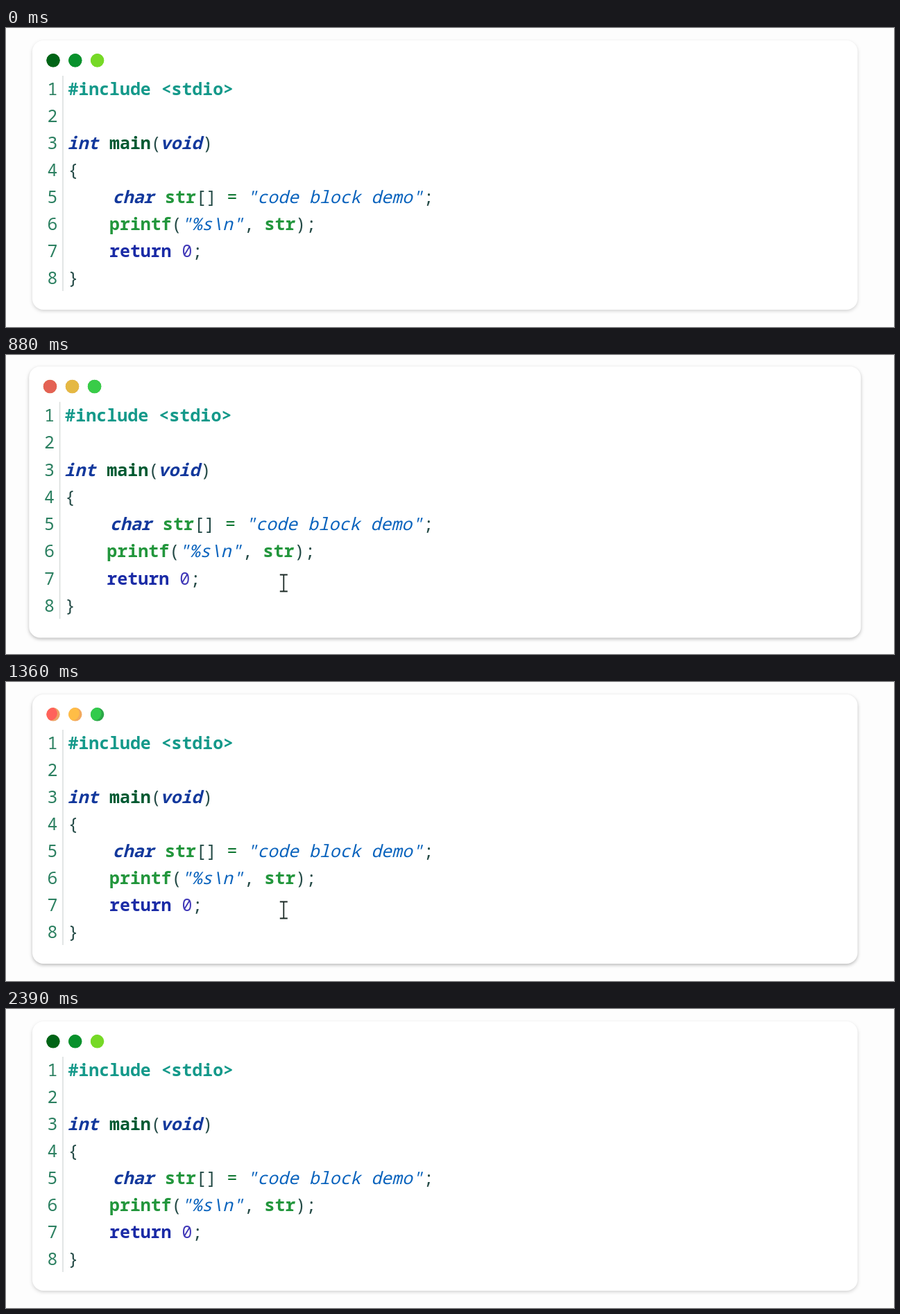
Animation, 1280 px wide and 432 px high, one loop 3140 ms. Source, as an HTML page:

```html
<!DOCTYPE html>
<html lang="en">
<head>
<meta charset="utf-8">
<title>Code block</title>
<style>
html, body { margin: 0; width: 100%; height: 100%; overflow: hidden; background: #fdfdfd; }
svg { display: block; }
text { font: 24.85px "Noto Sans Mono", "DejaVu Sans Mono", monospace; white-space: pre; }
.num { fill: #2c8061; }
.pre { fill: #14998a; font-weight: bold; }
.type { fill: #12389c; font-weight: bold; font-style: italic; }
.main { fill: #005a32; font-weight: bold; }
.id { fill: #22963c; font-weight: bold; }
.str { fill: #0a63bd; font-style: italic; }
.key { fill: #1a2ba6; font-weight: bold; }
.zero { fill: #4038b8; }
.op { fill: #117733; }
.p { fill: #254b47; }
</style>
</head>
<body>
<svg width="1280" height="432" viewBox="0 0 1280 432">
  <clipPath id="dotClip"></clipPath>
  <g id="card">
    <rect id="panel" x="38" y="18" width="1189.5" height="389" rx="16" fill="#fff"/>
    <g id="rims"></g>
    <g clip-path="url(#dotClip)"><g id="faces"></g></g>
    <path d="M82 69V380" stroke="#d9dddc" stroke-width="1.5"/>
    <g id="code"></g>
  </g>
  <path id="cursor" d="M-5.5 -12H5.5M-5.5 12H5.5M0 -12V12" fill="none" stroke="#1c2a26" stroke-width="1.8"/>
</svg>
<script>
const LOOP = 3140, CHAR = 14.9;
const $ = id => document.getElementById(id);

function add(parent, name, attrs, content = "") {
  const el = document.createElementNS("http://www.w3.org/2000/svg", name);
  for (const k in attrs) el.setAttribute(k, attrs[k]);
  el.textContent = content;
  return parent.appendChild(el);
}

// Each line: [class, text] pairs, an empty class only advances.
const lines = [
  [["pre", "#include <stdio>"]],
  [],
  [["type", "int"], ["", " "], ["main", "main"], ["p", "("], ["type", "void"], ["p", ")"]],
  [["p", "{"]],
  [["", "    "], ["type", "char"], ["", " "], ["id", "str"], ["p", "[] "], ["op", "="], ["", " "],
   ["str", '"code block demo"'], ["p", ";"]],
  [["", "    "], ["id", "printf"], ["p", "("], ["str", '"%s\\n"'], ["p", ", "], ["id", "str"], ["p", ");"]],
  [["", "    "], ["key", "return"], ["", " "], ["zero", "0"], ["p", ";"]],
  [["p", "}"]]
];
lines.forEach((tokens, i) => {
  const y = 97 + i * 38.95;
  add($("code"), "text", { x: 59.5, y, class: "num" }, i + 1);
  let x = i === 4 ? 95 : 89.5;
  for (const [cls, str] of tokens) {
    const slant = cls === "type" || cls === "str" ? 1 : 0;
    if (cls) add($("code"), "text", { x: x - slant, y, class: cls }, str);
    x += str.length * CHAR;
  }
});

const dots = [
  { idle: [0, 100, 22], face: [255, 98, 91], rim: [236, 164, 102] },
  { idle: [8, 145, 44], face: [255, 189, 70], rim: [242, 169, 92] },
  { idle: [118, 217, 38], face: [50, 203, 76], rim: [44, 166, 72] }
].map((d, i) => {
  const at = { cx: 68 + i * 31.8, cy: 46.8, r: 9.7 };
  add($("dotClip"), "circle", at);
  return { ...d, rimEl: add($("rims"), "circle", at), faceEl: add($("faces"), "circle", { ...at, r: 9.9 }) };
});

const clamp = v => Math.max(0, Math.min(1, v));
const mix = (a, b, k) => `rgb(${a.map((v, i) => Math.round(v + (b[i] - v) * k))})`;

// CSS "ease" curve
function ease(t, start, duration) {
  const p = clamp((t - start) / duration);
  let lo = 0, hi = 1;
  for (let i = 0; i < 20; i++) {
    const u = (lo + hi) / 2;
    if (.75 * u * (1 - u) + u ** 3 < p) lo = u; else hi = u;
  }
  return .3 * lo * (1 - lo) ** 2 + 3 * lo * lo * (1 - lo) + lo ** 3;
}

function draw(t) {
  const back = ease(t, 1050, 300);
  const zoom = 1 + .0083 * (ease(t, 650, 300) - back);
  $("card").setAttribute("transform", `translate(632.7 212.5) scale(${zoom}) translate(-632.7 -212.5)`);

  const hover = ease(t, 635, 400) - ease(t, 1950, 400);
  $("panel").style.filter = `drop-shadow(0 2px 2.5px rgba(0,0,0,${.17 + .1 * hover}))`;
  $("faces").setAttribute("transform", `translate(${-4 * back} ${-1.2 * back})`);
  for (const d of dots) {
    d.rimEl.setAttribute("fill", mix(d.idle, d.rim, hover));
    d.faceEl.setAttribute("fill", mix(d.idle, d.face, hover));
  }

  const k = clamp((t - 645) / 215), move = k * k * (3 - 2 * k);
  const [x, y] = t < 1890 ? [359 + 41.3 * move, 377.5 - 48 * move] : [398, 339.5];
  $("cursor").setAttribute("transform", `translate(${x} ${y})`);
  $("cursor").style.display = t >= 620 && t < 1960 ? "" : "none";
}

const begin = performance.now();
function tick() {
  draw((performance.now() - begin) % LOOP);
  requestAnimationFrame(tick);
}
tick();
</script>
</body>
</html>
```
